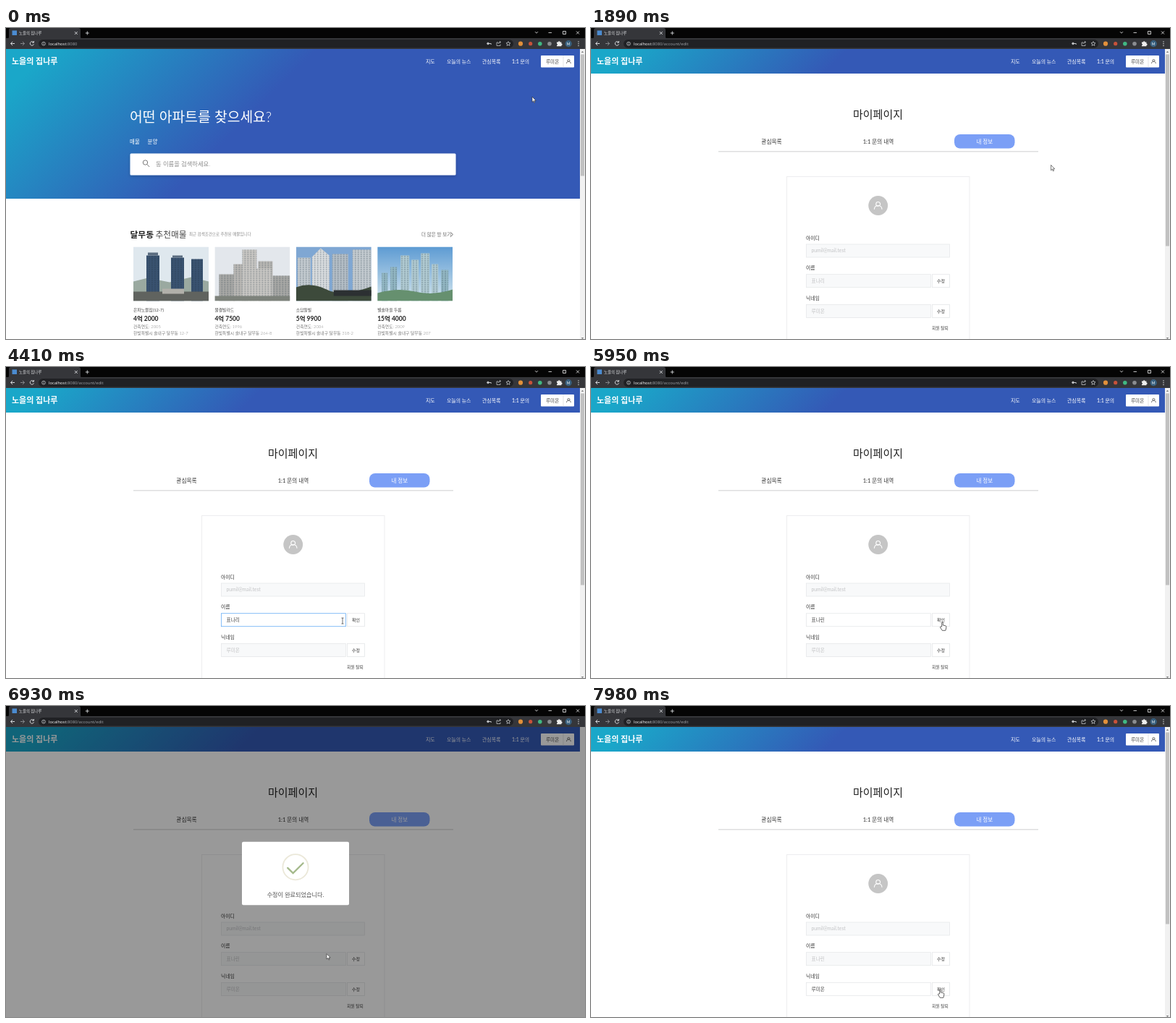
An HTML page that plays this animation: 800 px wide and 430 px high, repeating every 8000 ms.

```html
<!DOCTYPE html>
<html lang="ko">
<head>
<meta charset="utf-8">
<style>
html, body { margin: 0; width: 100%; height: 100%; overflow: hidden; background: #fff; }
svg { display: block; width: 800px; height: 430px; font-family: Lato, "Noto Sans CJK KR", "Noto Sans CJK", sans-serif; }
.ui { font-family: "Noto Sans", "Noto Sans CJK KR", "Noto Sans CJK", sans-serif; }
</style>
</head>
<body>
<svg id="stage" viewBox="0 0 800 430" xmlns="http://www.w3.org/2000/svg"></svg>
<script>
const LOOP = 8000;
const MODAL_IN = 5965, MODAL_OUT = 7000, PAGE_AT = 1610;

// Markup helpers; text is placed by the middle of its line.
const text = (x, y, s, size, fill = '#333', more = '') =>
  `<text x="${x}" y="${(y + size * .36).toFixed(2)}" font-size="${size}" fill="${fill}" ${more}>${s}</text>`;
const rect = (x, y, w, h, fill, more = '') =>
  `<rect x="${x}" y="${y}" width="${w}" height="${h}" fill="${fill}" ${more}/>`;
const dot = (x, y, r, fill, more = '') => `<circle cx="${x}" cy="${y}" r="${r}" fill="${fill}" ${more}/>`;
const line = (d, stroke, w = 1, more = '') =>
  `<path d="${d}" fill="none" stroke="${stroke}" stroke-width="${w}" ${more}/>`;
const group = (id, body, more = '') => `<g id="${id}" ${more}>${body}</g>`;
const MID = 'text-anchor="middle"', BOLD = 'font-weight="700"', MEDIUM = 'font-weight="500"', LIGHT = 'font-weight="300"';
const person = (x, y, s, color, w, id = '') =>
  line(`M${x - s} ${y + s}c0-${s * 1.35} ${s * 2}-${s * 1.35} ${s * 2} 0M${x - s * .55} ${y - s * .4}a${s * .55} ${s * .55} 0 1 1 ${s * 1.1} 0a${s * .55} ${s * .55} 0 1 1-${s * 1.1} 0`, color, w, id);

function browser() {
  const grey = '#d5d7da';
  return rect(0, 0, 800, 15, '#050505') +
    `<path d="M1 15q3 0 3-3V3q0-3 3-3h93q3 0 3 3v9q0 3 3 3z" fill="#35363a"/>` +
    rect(0, 14, 800, 15, '#35363a') + rect(8.5, 3.5, 6.5, 6.5, '#4b8bd0') +
    text(18, 7, '노을의 집나루', 5.4, '#e4e5e8', 'class="ui"') +
    line('M94.8 5l4 4m0-4l-4 4M109.8 7h5m-2.5-2.5v5', grey, .9) +
    line('M731 5.2l2 2 2-2M749.5 6.5h4.5M769.5 4.5h4v4h-4zM788 4.5l4 4m0-4l-4 4', '#eee', .8) +
    line('M12 21.5H6.5m2.6-2.6l-2.6 2.6 2.6 2.6', grey, 1) +
    line('M20 21.5h5.5m-2.6-2.6l2.6 2.6-2.6 2.6', '#85878b', 1) +
    line('M38 19.7a2.7 2.7 0 1 0 .5 2.6M38.4 18v2.2h-2.2', grey, 1) +
    rect(45, 16, 656, 11.5, '#202124', 'rx="5.7"') +
    line('M49.6 21.7a2.4 2.4 0 1 0 4.8 0a2.4 2.4 0 1 0-4.8 0M52 21.3v1.7M52 20v.6', grey, .7) +
    `<text x="59" y="23.7" font-size="5.8" fill="#f1f1f1" class="ui">localhost<tspan fill="#989ba0">:8080<tspan id="path"></tspan></tspan></text>` +
    line('M664.7 21.5a1.3 1.3 0 1 0 2.6 0a1.3 1.3 0 1 0-2.6 0h5.5v1.5', grey, .9) +
    line('M680 20h-2v4.5h5v-2M680 22q0-2.5 3.5-2.5m-1.5-1.5l1.5 1.5-1.5 1.5', grey, .7) +
    line('M694 18.6l.9 2 2.1.2-1.6 1.4.5 2.2-1.9-1.2-1.9 1.2.5-2.2-1.6-1.4 2.1-.2z', grey, .7) +
    dot(711, 21.7, 3.1, '#e2903a') + dot(724.7, 21.7, 2.6, '#c8523a') + dot(737.8, 21.7, 2.8, '#41b883') +
    dot(751, 21.7, 2.8, '#8b8d91') +
    `<path d="M761 19.5h2a1.2 1.2 0 0 1 2.4 0h2v2a1.2 1.2 0 0 1 0 2.4v1.4H761v-1.6a1 1 0 0 0 0-2z" fill="#eee"/>` +
    dot(777.2, 21.7, 4.6, '#38607f') + text(777.2, 21.7, 'M', 5, '#fff', MID) +
    [19, 21.7, 24.4].map(y => dot(791, y, .75, grey)).join('');
}

const tower = (x, y, w, h, fill) => rect(x, y, w, h, fill) + rect(x, y, w, h, 'url(#windows)');
const towers = (list, fill) => list.map(([x, y, w]) => tower(x, y, w, 75 - y, fill)).join('');

const photos = [
  rect(0, 0, 104, 75, '#dfe8ee') + `<path d="M0 48l20-5 30 6 30-7 24 6v27H0z" fill="#9aa9a0"/>` +
    towers([[18, 12, 18], [52, 15, 18], [80, 17, 16]], '#395270') +
    rect(20, 8, 14, 4, '#5b6d80') + rect(54, 12, 14, 3, '#5b6d80') + rect(0, 62, 104, 13, '#60635f') + rect(40, 58, 30, 7, '#b1b0aa'),
  rect(0, 0, 104, 75, '#e3e7ec') + towers([[6, 38, 22], [80, 40, 24]], '#aaaaa7') +
    towers([[26, 24, 20], [60, 20, 20]], '#bcbab6') + towers([[38, 4, 20], [48, 30, 30]], '#cbc9c5') +
    rect(0, 68, 104, 7, '#7d827b'),
  rect(0, 0, 104, 75, '#7fa7d3') + towers([[2, 15, 18], [78, 4, 26]], '#c6cdd2') +
    `<path d="M22 75V14L34 2l12 10v63z" fill="#dcdfe1"/><path d="M22 75V14L34 2l12 10v63z" fill="url(#windows)"/>` +
    towers([[50, 10, 22]], '#b6c0c8') + `<path d="M0 56q20-8 42 3t62-4v20H0z" fill="#3d4a3b"/>` + rect(52, 60, 52, 8, '#2c3032'),
  rect(0, 0, 104, 75, 'url(#sky)') + towers([[6, 36, 8], [18, 28, 9], [88, 32, 10]], '#94b9c5') +
    towers([[32, 12, 12], [47, 18, 10], [60, 9, 12], [75, 24, 9]], '#b3cdd4') +
    `<path d="M0 64q28-8 52-2t52-3v16H0z" fill="#66906f"/>`
];

function home() {
  const cards = [
    ['은파노블집(12-7)', '4억 2000', 2005, '12-7'], ['물결빌라드', '4억 7500', 1996, '264-8'],
    ['소담들빌', '5억 9900', 2004, '318-2'], ['별솔마을 두름', '15억 4000', 2009, '207']
  ];
  return rect(0, 29, 793, 207, 'url(#tall)') +
    text(171, 123.5, '어떤 아파트를 찾으세요?', 19.3, '#fff', LIGHT) +
    text(171, 157.5, '매물', 7.5, '#fff') + text(195.5, 157.5, '분양', 7.5, '#fff') +
    rect(171.5, 173.5, 450, 30, '#fff', 'rx="1.5" filter="url(#soft)"') +
    line('M189.3 186a3.2 3.2 0 1 0 6.4 0a3.2 3.2 0 1 0-6.4 0M194.8 188.4l3.4 3.6', '#777', 1) +
    text(207, 188.5, '동 이름을 검색하세요.', 8.3, '#8c8c8c', LIGHT) +
    text(171.5, 285.5, '달무동', 11.8, '#222', BOLD) + text(206.5, 285.5, '추천매물', 11.7, '#444', LIGHT) +
    text(253, 285, '최근 검색조건으로 추천된 매물입니다', 5.5, '#888', LIGHT) +
    text(574, 285.5, '더 많은 방 보기', 6.5, '#666', LIGHT) + line('M614.6 282.8l2.7 2.7-2.7 2.7', '#555', .9) +
    cards.map(([name, price, year, lot], i) => {
      const x = 176 + i * 112.4;
      return `<svg x="${x}" y="302.5" width="104" height="75">${photos[i]}</svg>` +
        text(x, 389.8, name, 5.8, '#444') + text(x, 401.7, price, 8.5, '#222', BOLD) +
        text(x, 412.8, `건축연도: ${year}`, 5.8, '#777', LIGHT) +
        text(x, 421.5, `한빛특별시 솔내구 달무동 ${lot}`, 5.8, '#777', LIGHT);
    }).join('');
}

const field = (id, y, label) =>
  text(297, y - 18, label, 6.8, '#333') +
  rect(297.5, y - 9, 172, 18, '#f8f9fa', `id="${id}Box" stroke="#e6e8ea" stroke-width=".8"`) +
  rect(471.5, y - 9, 24, 18, '#fff', 'stroke="#e4e6e8" stroke-width=".8"') +
  text(304.5, y, '', 6.7, '#bbb', `id="${id}Text"`) + text(483.5, y, '', 6, '#333', `id="${id}Btn" ${MID}`);

function account() {
  return rect(0, 29, 793, 34, 'url(#short)') +
    text(396.5, 120, '마이페이지', 15, '#222', MID) +
    text(249.5, 157, '관심목록', 7.7, '#333', MID) + text(397, 157, '1:1 문의 내역', 7.6, '#333', MID) +
    rect(502, 147, 83.5, 19.5, '#7b9ff6', 'rx="8"') + text(543.8, 157, '내 정보', 7.5, '#fff', `${MID} ${MEDIUM}`) +
    rect(176, 170.4, 442, .9, '#c8c9cb') +
    rect(270.5, 205.5, 252.5, 240, '#fff', 'stroke="#ececee" stroke-width=".9"') +
    dot(396.7, 245.5, 13.4, '#c5c5c5') + person(396.7, 245.5, 5.3, '#fff', 1.1) +
    text(297, 290.3, '아이디', 6.8, '#333') +
    rect(297.5, 299, 198, 18, '#f8f9fa', 'stroke="#e6e8ea" stroke-width=".8"') +
    text(304.5, 308, 'pumil@mail.test', 6.8, '#c3c4c6') +
    field('name', 349.7, '이름') + field('nick', 391.5, '닉네임') +
    text(471, 415, '회원 탈퇴', 5.8, '#444');
}

const nav = () => text(8, 46.3, '노을의 집나루', 11, '#fff', BOLD) +
  [[580, '지도'], [609, '오늘의 뉴스'], [658, '관심목록'], [699, '1:1 문의']]
    .map(([x, s]) => text(x, 46.3, s, 6.9, '#fff', MEDIUM)).join('') +
  rect(739, 38, 46, 16.5, '#fff', 'rx="1"') + line('M770 38v16.5', '#d9d9d9', .7) +
  rect(770.3, 38.4, 14.4, 15.8, 'none', 'id="userBox" stroke-width=".8"') +
  text(746, 46.3, '루미온', 6.6, '#444') + person(777.4, 46.2, 2.9, '#555', .8, 'id="userIcon"');

const menu = () => rect(690.5, 56.5, 94, 72.5, '#fff', 'rx="1" filter="url(#soft)"') +
  rect(690.5, 57, 94, 22.5, '#e6f7ff', 'id="menuRow"') + line('M690.5 79.5h94M690.5 102.5h94', '#eee', .6) +
  [[68, '내 정보'], [90.5, '1:1 문의 내역'], [115.3, '로그아웃']].map(([y, s]) => text(701, y, s, 6.8, '#444')).join('');

const scrollbar = () => rect(793, 29, 7, 401, '#f1f1f1') + rect(794, 36.5, 5, 168, '#c1c1c1', 'id="thumb"') +
  `<path d="M794.8 34l1.7-2 1.7 2zM794.8 428l1.7 2 1.7-2z" fill="#777"/>`;

const popup = () => rect(-74, -43.8, 148, 87.6, '#fff', 'rx="2"') +
  dot(0, -8.8, 17.6, 'none', 'stroke="#ebe8d9" stroke-width="1.8"') +
  line('M-10.8-7.6l7.4 7.2L10.6-14.2', '#a4b98b', 2.3, 'id="check" pathLength="1" stroke-dasharray="1 2" stroke-linecap="round"') +
  text(0, 29.2, '수정이 완료되었습니다.', 8.15, '#545454', MID);

const pointers = () =>
  group('arrow', `<path d="M0 0v7.4l1.7-1.6 1.2 2.6 1.1-.5-1.2-2.5h2.4z" fill="#fff" stroke="#222" stroke-width=".6"/>`) +
  group('hand', `<path d="M-.8 6V.7q0-1 .8-1t.8 1V4l3.6.8q1 .2 1 1.3L5 9l-.7 2.3H-.2L-3 7q-.2-1 .8-1z" fill="#fff" stroke="#222" stroke-width=".7"/>`) +
  group('beam', line('M-1.5-4h3M0-4v8M-1.5 4h3', '#333', .7));

const stage = document.getElementById('stage');
const diagonal = (id, len) => `<linearGradient id="${id}" gradientUnits="userSpaceOnUse" x1="0" y1="29" x2="${len}" y2="${29 + len}">
  <stop offset=".06" stop-color="#1aa7c9"/><stop offset=".43" stop-color="#3459b6"/></linearGradient>`;
stage.innerHTML = `<defs>${diagonal('tall', 500)}${diagonal('short', 413.5)}
  <linearGradient id="sky" x2="0" y2="1"><stop stop-color="#5d9bd3"/><stop offset="1" stop-color="#d4e6ee"/></linearGradient>
  <pattern id="windows" width="4" height="3" patternUnits="userSpaceOnUse">${rect(.8, .8, 2.2, 1.3, '#223447', 'opacity=".4"')}</pattern>
  <filter id="soft" x="-10%" y="-20%" width="120%" height="150%"><feDropShadow dx="0" dy="1.5" stdDeviation="2" flood-opacity=".2"/></filter></defs>` +
  rect(0, 0, 800, 430, '#fff') + group('home', home()) + group('account', account()) + nav() +
  group('menu', menu()) + group('scroll', scrollbar()) +
  rect(0, 29, 800, 401, '#000', 'id="shade"') + group('popup', popup()) +
  group('status', rect(0, 425, 68, 5, '#292a2d') + text(1, 429, 'localhost:8080/account/edit', 5.2, '#d0d2d5', 'class="ui"')) +
  browser() + group('pointer', pointers());

const $ = Object.fromEntries([...stage.querySelectorAll('[id]')].map(el => [el.id, el]));
const show = (el, on) => el.setAttribute('display', on ? 'inline' : 'none');
const set = (el, attrs) => { for (const k in attrs) el.setAttribute(k, attrs[k]); };
const span = (t, a, b) => Math.min(1, Math.max(0, (t - a) / (b - a)));
const smooth = p => p * p * (3 - 2 * p);
const easeOut = p => 1 - (1 - p) ** 2.4;

// Eased interpolation through [time, ...values] stops.
function follow(stops, t, ease = smooth) {
  const i = stops.findIndex(s => s[0] > t);
  if (i === 0) return stops[0].slice(1);
  if (i < 0) return stops[stops.length - 1].slice(1);
  const a = stops[i - 1], b = stops[i], p = ease(span(t, a[0], b[0]));
  return a.slice(1).map((v, k) => v + (b[k + 1] - v) * p);
}

const PATH = [
  [70, 727, 95], [560, 777, 45], [910, 777, 45], [1330, 714, 67], [PAGE_AT, 714, 67],
  [2240, 527, 359], [2520, 484, 348], [2940, 484, 348], [3010, 482, 351], [3360, 482, 351],
  [3600, 486, 348], [3850, 482, 351], [3990, 482, 351], [4130, 476, 352], [4340, 465, 351],
  [5600, 465, 351], [5880, 485.5, 353], [6020, 485.5, 353], [6090, 482, 354], [6440, 482, 354],
  [7070, 437.5, 341], [7210, 445, 297], [7280, 445, 297], [7770, 482.5, 392]
];
const POP = [[0, .7], [.45, 1.05], [.8, .95], [1, 1]];

function fieldState(id, value, editing, focused) {
  $[id + 'Text'].textContent = value;
  $[id + 'Btn'].textContent = editing ? '확인' : '수정';
  set($[id + 'Text'], { fill: editing ? '#444' : '#c0c1c3' });
  set($[id + 'Box'], { fill: editing ? '#fff' : '#f8f9fa', stroke: focused ? '#6aaef5' : '#e6e8ea' });
}

function nameAt(t) {
  const typed = [[5180, '린'], [4970, '리'], [4830, 'ㄹ'], [4690, '']].find(s => t >= s[0]);
  return '표나' + (typed ? typed[1] : '리');
}

function draw(t) {
  const onAccount = t >= PAGE_AT;
  const [x, y] = follow(PATH, t);
  show($.home, !onAccount);
  show($.account, onAccount);
  $.path.textContent = onAccount ? '/account/edit' : '';
  set($.thumb, { height: onAccount ? 265 : 168 });

  const open = easeOut(span(t, 640, 840)) * (1 - span(t, PAGE_AT, 1780));
  const active = t > 560 && t < 1780;
  set($.menu, { opacity: open, transform: `translate(0 ${56.5 * (1 - (.8 + .2 * open))}) scale(1 ${.8 + .2 * open})` });
  show($.menu, open > 0);
  show($.menuRow, y > 57 && t > 910 && y < 80);
  set($.userIcon, { stroke: active ? '#4096ee' : '#555' });
  set($.userBox, { stroke: active ? '#69b1f5' : 'none' });
  show($.status, t >= 1190 && t < 1680);

  const editing = t >= 2660 && t < MODAL_IN, editNick = t >= 7950;
  fieldState('name', nameAt(t), editing, t >= 4340 && t < 5880);
  fieldState('nick', '루미온', editNick, false);

  const modal = t >= MODAL_IN && t < MODAL_OUT + 150;
  const out = span(t, MODAL_OUT, MODAL_OUT + 150);
  const [grow] = follow(POP, span(t, MODAL_IN, MODAL_IN + 300));
  show($.scroll, !modal);
  show($.popup, modal);
  set($.popup, { transform: `translate(400 231.5) scale(${grow * (1 - out * .5)})`, opacity: 1 - out });
  const drawn = span(t, MODAL_IN + 400, MODAL_IN + 650);
  set($.check, { 'stroke-dashoffset': 1 - drawn });
  show($.check, drawn > 0);
  set($.shade, { opacity: .4 * span(t, MODAL_IN, MODAL_IN + 100) * (1 - span(t, MODAL_OUT, MODAL_OUT + 108)) });

  const onButton = x > 471 && x < 496 && ((y > 340 && y < 359) || (y > 382 && y < 401));
  const hand = onAccount ? onButton && !modal : x > 690 && (y > 57 || x > 739) && y < 129 && (t > 910 || y < 55);
  const beam = editing && x > 297 && x < 470 && y > 340 && y < 359;
  show($.pointer, t < 4690 || t >= 5600);
  set($.pointer, { transform: `translate(${x} ${y})` });
  show($.hand, hand);
  show($.beam, beam);
  show($.arrow, !hand && !beam);
}

function tick() {
  draw(performance.now() % LOOP);
  requestAnimationFrame(tick);
}
tick();
</script>
</body>
</html>
```
